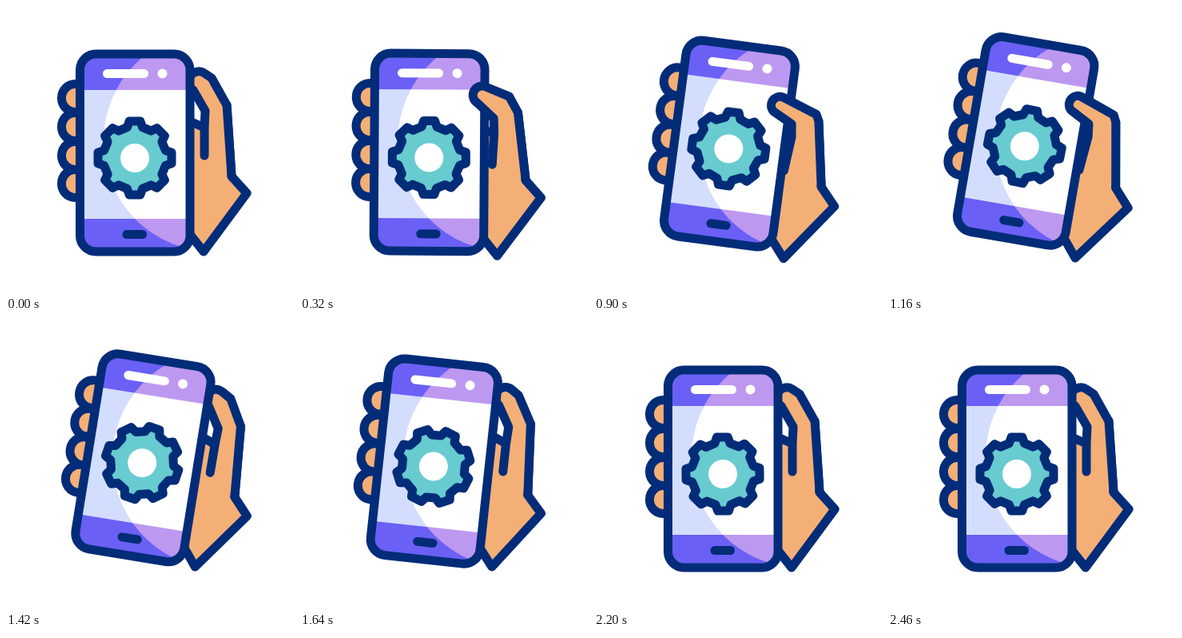
An HTML page for the animation above (2.62 s loop, 360 by 360 pixels).

```html
<!DOCTYPE html>
<html lang="en">
<head>
<meta charset="utf-8">
<title>Phone in hand</title>
<style>
  html, body { margin: 0; width: 100%; height: 100%; overflow: hidden; background: #fff; }
  svg { display: block; width: 100vw; height: 100vh; }
  .line { stroke: #032c78; stroke-width: 11; stroke-linecap: round; stroke-linejoin: round; }
  .skin { fill: #f4af76; }
</style>
</head>
<body>
<svg viewBox="0 0 360 360">
  <defs>
    <clipPath id="screen"><rect x="92.5" y="60" width="137.5" height="247" rx="20"/></clipPath>
    <clipPath id="glow"><circle cx="259" cy="169.5" r="137.5"/></clipPath>
  </defs>
  <g id="scene">
    <g id="fingers" class="line skin"></g>
    <path id="palm" class="line skin"/>
    <g id="phone">
      <g clip-path="url(#screen)">
        <rect x="90" y="58" width="142" height="251" fill="#d3defe"/>
        <path d="M90 58h142v47H90zM90 266h142v43H90z" fill="#6a60f5"/>
        <g clip-path="url(#glow)">
          <rect x="90" y="58" width="142" height="251" fill="#bd98f0"/>
          <rect x="90" y="105" width="142" height="161" fill="#fff"/>
        </g>
      </g>
      <rect class="line" x="92.5" y="60" width="137.5" height="247" rx="20" fill="none"/>
      <path d="M126.5 84.5H172.5" stroke="#fff" stroke-width="11" stroke-linecap="round"/>
      <circle cx="195.5" cy="84.5" r="6" fill="#fff"/>
      <path class="line" d="M151 285.5H170.5"/>
      <g id="gear">
        <path id="cog" class="line" fill="#67cbd0"/>
        <circle cx="161" cy="190" r="18" fill="#fff"/>
      </g>
    </g>
    <path id="thumb" class="line skin"/>
  </g>
</svg>
<script>
  const LOOP = 2620;
  const $ = id => document.getElementById(id);
  const scene = $('scene'), phone = $('phone'), palm = $('palm'), thumb = $('thumb'), gear = $('gear');

  // Hand outline points: [rest x, rest y, pressed x, pressed y]
  const HAND = {
    web:     [225, 142, 225, 165],
    fold:    [248, 152, 237, 165],
    crease:  [248, 187, 233, 208],
    inner:   [249, 131, 235, 149],
    pad:     [234, 105, 210, 136],
    tip:     [248, 84, 219, 117],
    joint:   [257, 90, 264, 133],
    knuckle: [276, 124, 268, 141],
    wrist:   [282, 213, 282, 222],
    elbow:   [301, 234, 301.5, 244],
    heel:    [247, 307, 247, 317],
    base:    [224, 278, 225, 290]
  };

  // Sine ease from 0 to 1 between two times
  const ease = (t, from, to) => {
    const u = Math.min(1, Math.max(0, (t - from) / (to - from)));
    return (1 - Math.cos(Math.PI * u)) / 2;
  };

  const polar = (r, deg) => {
    const a = (deg - 90) * Math.PI / 180;
    return `${(161 + r * Math.cos(a)).toFixed(2)} ${(190 + r * Math.sin(a)).toFixed(2)}`;
  };

  function buildCog() {
    const pts = [];
    for (let a = 0; a < 360; a += 45) {
      pts.push(polar(39.5, a - 14), polar(46.5, a - 8.5), polar(46.5, a + 8.5), polar(39.5, a + 14));
    }
    $('cog').setAttribute('d', 'M' + pts.join('L') + 'Z');
  }

  function buildFingers() {
    $('fingers').innerHTML = [222, 187, 151, 115].map(y =>
      `<path d="M98 ${y - 17.5}H86.5a17 17.5 0 0 0 0 35H98"/>`).join('');
  }

  function drawHand(p) {
    const at = name => {
      const [x, y, px, py] = HAND[name];
      return `${x + (px - x) * p} ${y + (py - y) * p}`;
    };
    const run = names => names.split(' ').map(at).join('L');
    palm.setAttribute('d', `M${run('web fold knuckle wrist elbow heel base')}Z`);
    thumb.setAttribute('d',
      `M${run('crease fold inner pad')}A11 11 0 0 1 ${run('tip joint knuckle wrist')}`);
    // The thumb slips over the phone as it presses
    if (p > 0.12) {
      if (scene.lastElementChild !== thumb) scene.append(thumb);
    } else if (thumb.nextElementSibling !== phone) {
      scene.insertBefore(thumb, phone);
    }
  }

  function draw(t) {
    const tilt = 10 * (ease(t, 190, 1250) - ease(t, 1250, 2170));
    const press = ease(t, 180, 450) - ease(t, 1140, 1480);
    const spin = 45 * ease(t, 1010, 2310);
    scene.setAttribute('transform', `rotate(${tilt} 252 240)`);
    gear.setAttribute('transform', `rotate(${spin} 161 190)`);
    drawHand(press);
  }

  buildCog();
  buildFingers();
  const start = performance.now();
  const tick = () => {
    draw((performance.now() - start) % LOOP);
    requestAnimationFrame(tick);
  };
  tick();
</script>
</body>
</html>
```
